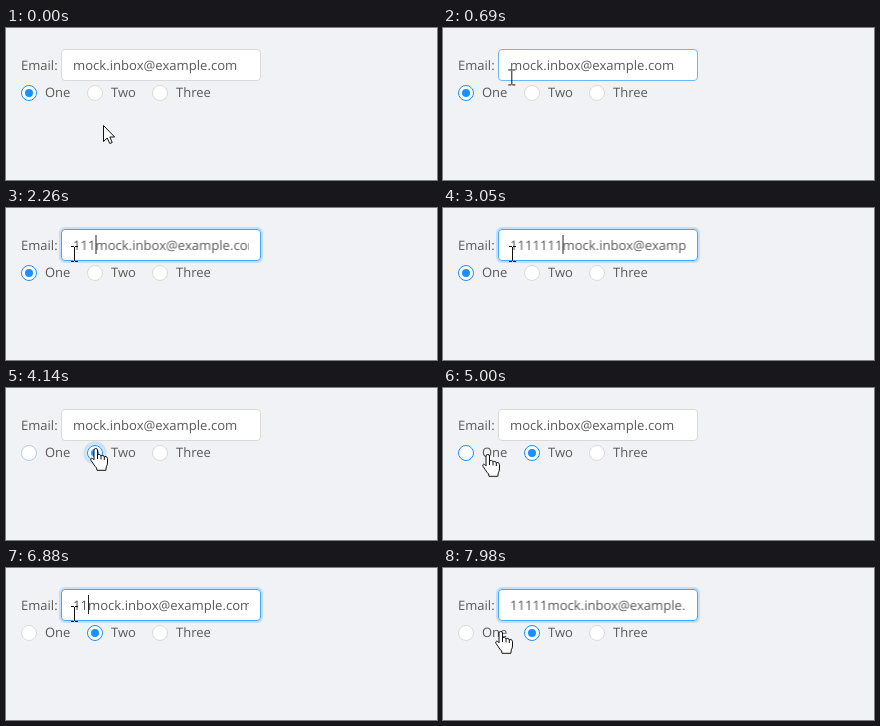
These frames come from a looping animation (431x152 px, 8 s). An HTML page:

```html
<!DOCTYPE html>
<html lang="en">
<head>
<meta charset="utf-8">
<title>Form demo</title>
<style>
  html, body { margin: 0; width: 100%; height: 100%; overflow: hidden; background: #f0f2f5; }
  svg { display: block; width: 431px; height: 152px; }
  text {
    font: 13px "Open Sans", "Noto Sans", sans-serif;
    fill: #595959;
    text-rendering: geometricPrecision;
  }
  .value text { font-size: 13.1px; }
  .end { text-anchor: end; }

  /* every part shares one 8 s clock */
  .a { animation: 8s linear infinite; }
  .s { animation: 8s step-end infinite; }

  .box { fill: #fff; stroke: #d9d9d9; animation-name: border; }
  .glow { fill: none; stroke: #1890ff; stroke-opacity: .2; stroke-width: 2; animation-name: glow; }
  .typed { animation-name: type; }
  .caret { fill: #222; shape-rendering: crispEdges; animation-name: caret; }

  .ring { fill: #fff; stroke: #d9d9d9; }
  .dot { fill: #1890ff; }
  .halo { fill: none; stroke: #1890ff; stroke-opacity: .12; stroke-width: 3; opacity: 0; }
  .pulse { fill: none; stroke: #1890ff; opacity: 0; }
  .dot, .pulse { transform-box: fill-box; transform-origin: center; }
  .one .ring { animation-name: ring1; }
  .one .dot { animation-name: dot1; }
  .one .halo { animation-name: halo1; }
  .one .pulse { animation-name: pulse1; }
  .two .ring { animation-name: ring2; }
  .two .dot { animation-name: dot2; }
  .two .halo { animation-name: halo2; }
  .two .pulse { animation-name: pulse2; }

  .cursor { animation-name: move; }
  .arrow { animation-name: arrow; }
  .beam { animation-name: beam; }
  .hand { animation-name: hand; }
  .arrow, .hand { fill: #fff; stroke: #111; stroke-linejoin: round; }
  .beam { fill: none; stroke: #111; shape-rendering: crispEdges; }

  @keyframes border {
    0%, 6.25%, 51.625%, 75.625% { stroke: #d9d9d9; }
    9.625%, 47.875%, 79.375%, 100% { stroke: #40a9ff; }
  }
  @keyframes glow {
    0%, 11.5%, 51.625%, 79.125% { opacity: 0; }
    14.5%, 47.875%, 82.125%, 100% { opacity: 1; }
  }
  @keyframes type {
    0%, 48.75% { transform: none; }
    23.5%, 84.125% { transform: translateX(7.5px); }
    26.375%, 86% { transform: translateX(15px); }
    28.25%, 89% { transform: translateX(22.5px); }
    31.125%, 90.875% { transform: translateX(30px); }
    33.25%, 93%, 100% { transform: translateX(37.5px); }
    35.125% { transform: translateX(45px); }
    37.25% { transform: translateX(52.5px); }
  }
  @keyframes caret {
    0%, 19.5%, 44%, 99.75%, 100% { opacity: 0; }
    12.5%, 23.5%, 79.125% { opacity: 1; }
  }

  @keyframes ring1 {
    0%, 48.75%, 62.5%, 70.5% { stroke: #1890ff; }
    52.5%, 60%, 74.25%, 100% { stroke: #d9d9d9; }
  }
  @keyframes dot1 {
    0%, 48.75%, 67.25%, 70.5% { transform: none; opacity: 1; animation-timing-function: cubic-bezier(.78, .14, .15, .86); }
    52.5%, 63.5%, 74.25%, 100% { transform: scale(0); opacity: 0; animation-timing-function: cubic-bezier(.78, .14, .15, .86); }
  }
  @keyframes halo1 {
    0%, 63.5%, 73.125%, 100% { opacity: 0; }
    66.25%, 70% { opacity: 1; }
  }
  @keyframes pulse1 {
    0%, 63.49% { transform: none; opacity: 0; }
    63.5% { transform: none; opacity: .5; animation-timing-function: ease-in-out; }
    68%, 100% { transform: scale(1.6); opacity: 0; }
  }

  @keyframes ring2 {
    0%, 44%, 67.25%, 69% { stroke: #d9d9d9; }
    46%, 63.5%, 71%, 100% { stroke: #1890ff; }
  }
  @keyframes dot2 {
    0%, 48.75%, 67.25%, 70.5% { transform: scale(0); opacity: 0; animation-timing-function: cubic-bezier(.78, .14, .15, .86); }
    52.5%, 63.5%, 74.25%, 100% { transform: none; opacity: 1; animation-timing-function: cubic-bezier(.78, .14, .15, .86); }
  }
  @keyframes halo2 {
    0%, 47.875%, 62.25%, 70%, 82.125%, 100% { opacity: 0; }
    51.625%, 58.75%, 73.75%, 79.125% { opacity: 1; }
  }
  @keyframes pulse2 {
    0%, 48.74%, 70.49% { transform: none; opacity: 0; }
    48.75%, 70.5% { transform: none; opacity: .5; animation-timing-function: ease-in-out; }
    53.25%, 75%, 100% { transform: scale(1.6); opacity: 0; }
  }

  @keyframes move {
    0% { transform: translate(97px, 97px); }
    .875% { transform: translate(97px, 97px); animation-timing-function: cubic-bezier(.3, .5, .5, 1); }
    9.625%, 11.5% { transform: translate(68px, 49px); }
    12.5%, 37.25% { transform: translate(68px, 46px); }
    38.125%, 41% { transform: translate(69px, 46px); }
    46%, 57.5% { transform: translate(90px, 60px); }
    62.5% { transform: translate(45px, 66px); }
    63.5%, 68.25% { transform: translate(45px, 67px); }
    71%, 73.125% { transform: translate(89px, 67px); }
    77.25%, 94.25% { transform: translate(68px, 46px); }
    95.75%, 100% { transform: translate(58px, 63px); }
  }
  @keyframes arrow {
    0% { opacity: 1; }
    6.25%, 100% { opacity: 0; }
  }
  @keyframes beam {
    0%, 43.25%, 95%, 100% { opacity: 0; }
    6.25%, 75.875% { opacity: 1; }
  }
  @keyframes hand {
    0%, 75.875% { opacity: 0; }
    43.25%, 95%, 100% { opacity: 1; }
  }
</style>
</head>
<body>
<svg viewBox="0 0 431 152">
  <clipPath id="field"><rect x="66.5" y="22" width="176.5" height="30"/></clipPath>

  <text x="15" y="42">Email:</text>
  <rect class="glow a" x="54" y="20" width="202" height="34" rx="5"/>
  <rect class="box a" x="55.5" y="21.5" width="199" height="31" rx="3.5"/>
  <g class="value" clip-path="url(#field)">
    <g class="typed s">
      <text class="end" x="67" y="42">1111111</text>
      <text x="67" y="42">mock.inbox@example.com</text>
      <rect class="caret s" x="67" y="27" width="1" height="19"/>
    </g>
  </g>

  <g class="one">
    <circle class="halo a" cx="23" cy="65" r="9.5"/>
    <circle class="ring a" cx="23" cy="65" r="7.5"/>
    <circle class="dot a" cx="23" cy="65" r="4"/>
    <circle class="pulse a" cx="23" cy="65" r="7.5"/>
    <text x="39" y="69">One</text>
  </g>
  <g class="two">
    <circle class="halo a" cx="89" cy="65" r="9.5"/>
    <circle class="ring a" cx="89" cy="65" r="7.5"/>
    <circle class="dot a" cx="89" cy="65" r="4"/>
    <circle class="pulse a" cx="89" cy="65" r="7.5"/>
    <text x="105" y="69">Two</text>
  </g>
  <circle class="ring" cx="154" cy="65" r="7.5"/>
  <text x="170" y="69">Three</text>

  <g class="cursor a">
    <path class="arrow s" d="M.5 .5V16.5L4.2 13 6.8 18.5 9.2 17.5 6.8 12H11.6Z"/>
    <path class="beam s" d="M-3 -7.5H0M1 -7.5H4M.5 -7V7M-3 7.5H0M1 7.5H4"/>
    <path class="hand s" d="M-2 2Q-2 .5 -.2 .5 1.5 .5 1.5 2V7.2Q2 6.2 3.3 6.4 4.8 6.6 5 8 5.6 7.1 6.9 7.4 8.2 7.7 8.3 9 9 8.2 10 8.6 11.5 9 11.5 10.8V15Q11.5 17 10.3 18.8L9.8 22.3H1L.6 20Q-1 18.6 -2.6 15.8L-5 12.4Q-5.8 10.6 -4.4 10.2 -3.3 10 -2 11.8ZM1.5 7V11M5 8V11.4M8.3 9V12"/>
  </g>
</svg>
</body>
</html>
```
